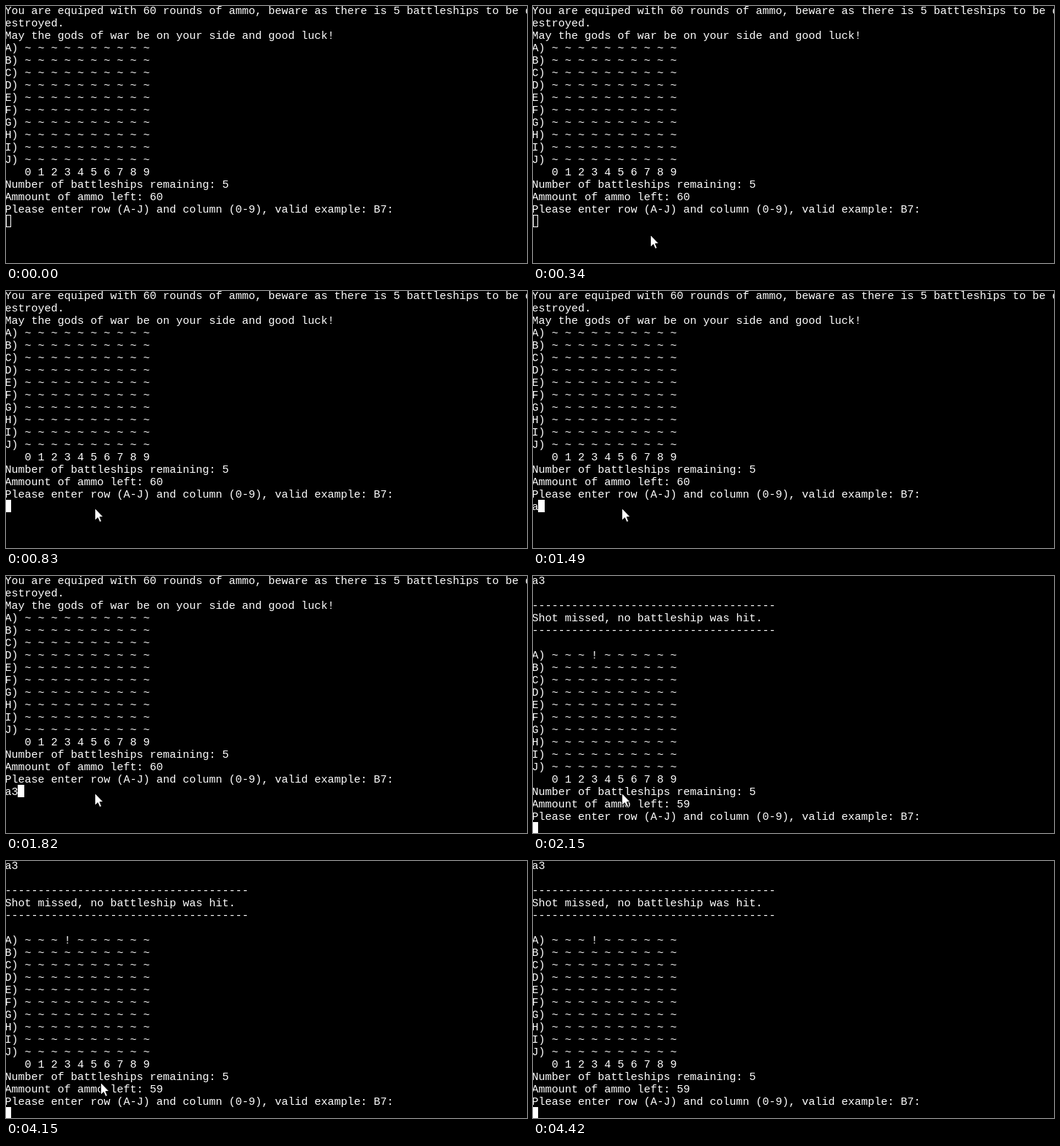
An HTML page with a canvas that plays this animation: 712 px wide and 352 px high, repeating every 6.74 s.

```html
<!DOCTYPE html>
<html lang="en">
<head>
<meta charset="utf-8">
<title>Battleship terminal</title>
<style>
html, body { margin: 0; width: 100%; height: 100%; overflow: hidden; background: #000; }
canvas { display: block; }
</style>
</head>
<body>
<canvas id="stage" width="712" height="352"></canvas>
<script>
const ctx = document.getElementById('stage').getContext('2d');
const LOOP = 6740, LEFT = -1.5, ROW = 17, BASE = 10.5, CELL = 9;
const TYPE_A = 1490, TYPE_3 = 1820, FIRE = 2150;
const ENTER = 200, FOCUS = 830, LEAVE = 4010, GONE = 4420;

// Pointer positions, one per step
const wayIn = [[371, 335], [247, 328], [160, 313], [138, 302], [127, 292],
  [121, 286], [119, 285], [119, 291], [121, 297]];
const wayOut = [[123, 297], [129, 303], [142, 315], [162, 329], [189, 343]];
const arrow = new Path2D('M.5 .5V17.3L4.4 13.6L7 19.5L9.6 18.4L7.2 12.5H12Z');

function board(shot) {
  const rows = [...'ABCDEFGHIJ'].map(letter => {
    const cells = Array(10).fill('~');
    if (shot && letter === 'A') cells[3] = '!';
    return letter + ') ' + cells.join(' ');
  });
  return [...rows, '   0 1 2 3 4 5 6 7 8 9',
    'Number of battleships remaining: 5',
    'Ammount of ammo left: ' + (shot ? 59 : 60),
    'Please enter row (A-J) and column (0-9), valid example: B7:'];
}

const rule = '-'.repeat(37);
const before = [
  'You are equiped with 60 rounds of ammo, beware as there is 5 battleships to be d',
  'estroyed.',
  'May the gods of war be on your side and good luck!',
  ...board(false)];
const after = ['a3', '', rule, 'Shot missed, no battleship was hit.', rule, '', ...board(true)];

function pointerAt(t) {
  if (t < ENTER || t >= GONE) return null;
  if (t < LEAVE) return wayIn[Math.min(wayIn.length - 1, Math.floor((t - ENTER) / 70))];
  return wayOut[Math.floor((t - LEAVE) / (GONE - LEAVE) * wayOut.length)];
}

function drawCaret(row, col, focused) {
  const x = Math.max(0, col * CELL - 2), right = col * CELL + 7, y = row * ROW - 3;
  ctx.lineWidth = 1;
  if (focused) ctx.fillRect(x, y, right - x, ROW);
  else {
    ctx.strokeStyle = '#fff';
    ctx.strokeRect(x + .5, y + .5, right - x - 1, ROW - 1);
  }
}

function drawPointer([x, y]) {
  ctx.save();
  ctx.translate(x, y);
  ctx.fill(arrow);
  ctx.strokeStyle = '#000';
  ctx.stroke(arrow);
  ctx.restore();
}

function draw(t) {
  ctx.fillStyle = '#000';
  ctx.fillRect(0, 0, 712, 352);
  ctx.fillStyle = '#fff';
  ctx.font = '15px "Courier New", "Liberation Mono", monospace';
  const lines = t < FIRE ? before : after;
  const typed = t < TYPE_A || t >= FIRE ? '' : t < TYPE_3 ? 'a' : 'a3';
  [...lines, typed].forEach((line, i) => ctx.fillText(line, LEFT, BASE + i * ROW));
  drawCaret(lines.length, typed.length, t >= FOCUS);
  const pointer = pointerAt(t);
  if (pointer) drawPointer(pointer);
}

const start = performance.now();
function tick() {
  draw((performance.now() - start) % LOOP);
  requestAnimationFrame(tick);
}
tick();
</script>
</body>
</html>
```
